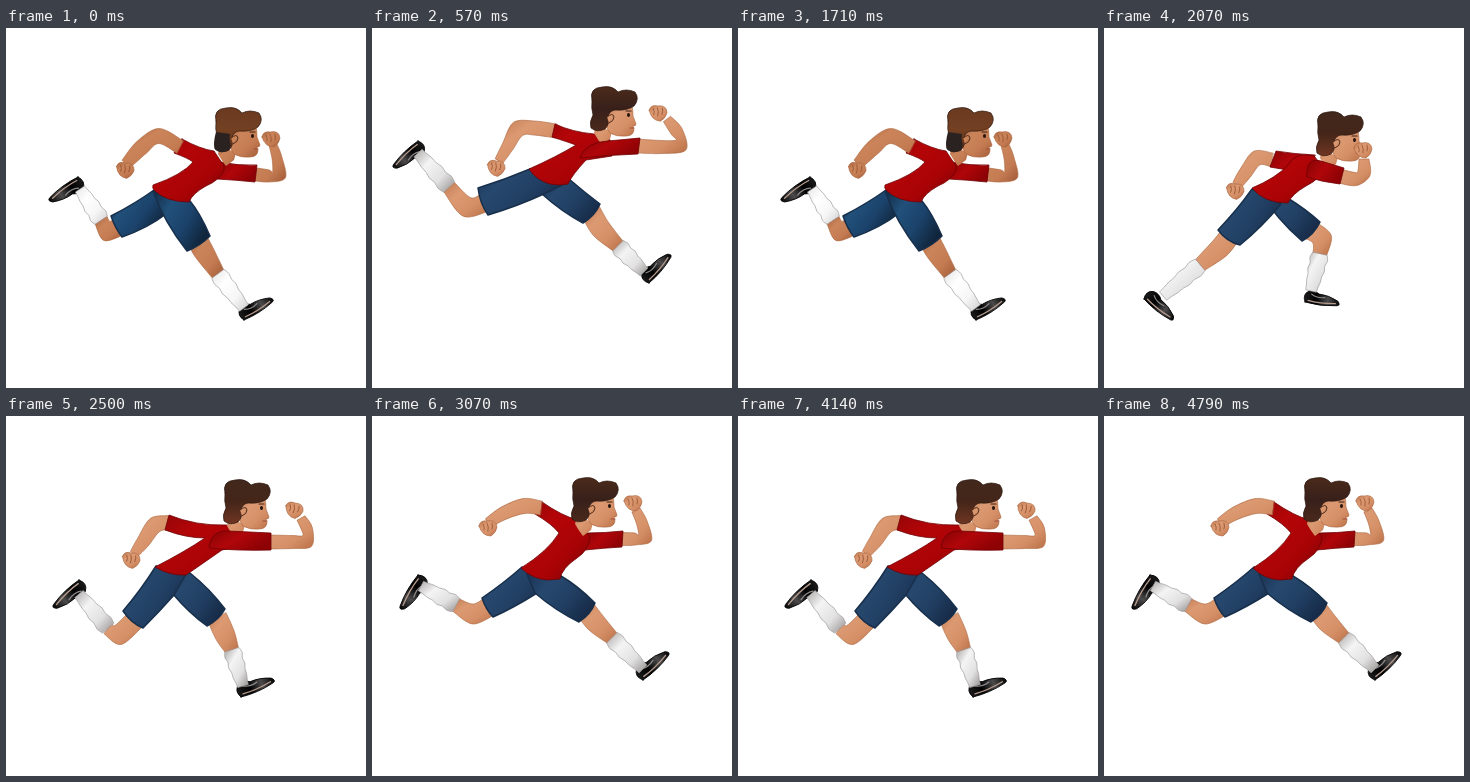
An HTML page for the animation above (5 s loop, 360 by 360 pixels).

```html
<!DOCTYPE html>
<html lang="en">
<head>
<meta charset="utf-8">
<title>Runner</title>
<style>
html, body { margin: 0; width: 100%; height: 100%; overflow: hidden; background: #fff; }
svg { display: block; width: 100%; height: 100%; }
</style>
</head>
<body>
<svg id="stage" viewBox="0 0 360 360"></svg>
<script>
const stage = document.getElementById('stage');

// ---- colours ----
const gradient = (id, dir, stops) =>
  `<linearGradient id="${id}" x1="0" y1="0" x2="${dir[0]}" y2="${dir[1]}">` +
  stops.map((c, i) => `<stop offset="${i / (stops.length - 1)}" stop-color="${c}"/>`).join('') +
  '</linearGradient>';

const defs = '<defs>' + [
  gradient('skinLight', [1, 1], ['#c07850', '#dc9a72', '#d58f66', '#b96f46']),
  gradient('skinDark', [1, 1], ['#a8623e', '#cb8459', '#c47b52', '#a05a36']),
  gradient('red', [1, 1], ['#8d0506', '#b40508', '#a90306', '#740203']),
  gradient('sleeve', [1, 0.5], ['#860304', '#b0060a', '#8e0205']),
  gradient('blueLight', [1, 0.6], ['#1b3355', '#27486e', '#213f63', '#172c49']),
  gradient('blueDark', [1, 0.6], ['#122a42', '#21507a', '#1b426a', '#10253b']),
  gradient('sockLight', [1, 1], ['#a9a6a5', '#f4f4f4', '#e2e1e1', '#928f8e']),
  gradient('sockDark', [1, 1], ['#e4e4e6', '#ffffff', '#f6f6f6', '#cfcfd1']),
  gradient('shoe', [1, 0], ['#1c1c1c', '#000000', '#4c4a4a', '#050505']),
  gradient('hairLight', [0, 1], ['#4b2b1b', '#38201a', '#4a291b']),
  gradient('hairRed', [0, 1], ['#42281c', '#442619', '#703522']),
  gradient('hairDark', [0, 1], ['#6a3a20', '#734022', '#5d2d18'])
].join('') + '</defs>';

// ---- helpers ----
const n = v => v.toFixed(1);
const shape = (d, fill, line = 'none', width = 1) =>
  `<path d="${d}" fill="${fill}" stroke="${line}" stroke-width="${width}" stroke-linejoin="round" stroke-linecap="round"/>`;

const spline = pts => pts.slice(1).map((p, i) => {
  const a = pts[i], before = pts[i - 1] || a, after = pts[i + 2] || p;
  return 'C' + [a[0] + (p[0] - before[0]) / 6, a[1] + (p[1] - before[1]) / 6,
    p[0] - (after[0] - a[0]) / 6, p[1] - (after[1] - a[1]) / 6, p[0], p[1]].map(n).join(' ');
}).join('');

// closed outline around a centre line of [x, y, width] points
function limb(pts) {
  const side = s => pts.map((p, i) => {
    const a = pts[i - 1] || p, b = pts[i + 1] || p;
    const dx = b[0] - a[0], dy = b[1] - a[1], k = s * p[2] / 2 / Math.hypot(dx, dy);
    return [p[0] - dy * k, p[1] + dx * k];
  });
  const l = side(1), r = side(-1).reverse();
  return `M${l[0].map(n)}${spline(l)}L${r[0].map(n)}${spline(r)}Z`;
}

const triples = list => {
  const out = [];
  for (let i = 0; i < list.length; i += 3) out.push(list.slice(i, i + 3));
  return out;
};

// ---- body parts ----
function shoe([hx, hy, tx, ty]) {
  const turn = Math.atan2(ty - hy, tx - hx) * 180 / Math.PI;
  const size = Math.hypot(tx - hx, ty - hy) / 36;
  return `<g transform="translate(${hx} ${hy}) rotate(${n(turn)}) scale(${size.toFixed(3)})">` +
    shape('M0 0Q-4 -8 3 -12Q9 -14 14 -10Q24 -10 34 -5Q38 -1 34 0Q17 3 0 0Z', 'url(#shoe)', '#000', 0.8) +
    shape('M3 -2Q16 0 32 -2', 'none', '#b49a8d', 1.3) +
    shape('M6 -9Q12 -5 20 -7', 'none', '#8d8b8b', 1.2) + '</g>';
}

function sock(sx, sy, ax, ay, tone) {
  const widths = [15, 18, 15, 17, 14, 14, 12, 11];
  const pts = widths.map((w, i) => {
    const t = i / (widths.length - 1);
    return [sx + (ax - sx) * t, sy + (ay - sy) * t, w];
  });
  return shape(limb(pts), `url(#sock${tone})`, '#9c9a9a', 0.7);
}

function leg({ bone, sole, shorts }, tone) {
  const [hx, hy, kx, ky, sx, sy, ax, ay] = bone;
  return shape(limb([[hx, hy, 20], [kx, ky, 20], [sx, sy, 14]]), `url(#skin${tone})`, '#a9663f', 0.6) +
    shoe(sole) + sock(sx, sy, ax, ay, tone) +
    shape(shorts, `url(#blue${tone})`, '#172f4b', 1.5);
}

function fist([x, y, turn], tone) {
  return `<g transform="translate(${x} ${y}) rotate(${turn})">` +
    shape('M-9 -2Q-8 -8 -1 -7Q8 -9 9 -1Q8 5 3 8Q-6 8 -9 -2Z', `url(#skin${tone})`, '#a9663f', 0.6) +
    shape('M-5 -4Q-3 -1 -4 2M-1 -5Q1 -1 0 3M4 -5Q5 -2 4 1', 'none', '#935232', 0.8) + '</g>';
}

function arm({ bone, hand, sleeve }, tone) {
  return shape(limb(triples(bone)), `url(#skin${tone})`, '#a9663f', 0.6) + fist(hand, tone) +
    (sleeve ? shape(sleeve, 'url(#sleeve)', '#6f0204', 0.8) : '');
}

function head([x, y], tone, hair) {
  const mop = 'M2 14Q-1 2 12 1Q22 -1 28 6Q36 2 45 6Q50 13 44 20Q37 25 25 24Q19 25 18 31Q20 38 15 43Q7 47 1 42Q-1 36 3 29Q1 22 2 14Z';
  return `<g transform="translate(${x} ${y})">` +
    shape('M6 38L4 47Q8 54 12 59L20 53L22 46Z', `url(#skin${tone})`) +
    shape('M14 24L42 19Q43 25 43 30L46 38Q46 40 43 40L44 44Q43 50 36 50Q27 51 20 47Q14 40 14 24Z',
      `url(#skin${tone})`, '#a9663f', 0.6) +
    shape(mop, `url(#hair${hair})`, '#2b1710', 0.7) +
    (hair === 'Dark' ? shape('M2 25L16 27Q15 31 16 35Q18 40 14 44Q5 47 1 42Q-1 35 2 25Z', '#2a2220') : '') +
    shape('M17 31Q23 26 24 31Q24 35 19 37', `url(#skin${tone})`, '#4c2a1a', 1) +
    shape('M36 25L41 25', 'none', '#3a2015', 1.2) +
    '<ellipse cx="38.5" cy="29" rx="1.5" ry="1.9" fill="#24150f"/>' +
    shape('M40 42L44 42', 'none', '#a24f3c', 1.2) + '</g>';
}

function runner(p) {
  const tone = p.tone || 'Light';
  return `<g visibility="hidden" transform="translate(${p.shift || [0, 0]})">` +
    arm(p.farArm, tone) + leg(p.farLeg, tone) + leg(p.nearLeg, tone) +
    shape(p.shirt, 'url(#red)', '#700204', 0.8) + head(p.head, tone, p.hair || tone) +
    arm(p.nearArm, tone) + '</g>';
}

// ---- poses of one stride pair ----
const landing = {
  tone: 'Dark', head: [208, 79],
  shirt: 'M176 111L168 125Q182 130 187 134Q176 147 147 157Q146 160 148 162Q160 174 183 174Q187 165 200 158Q214 152 218 142L218 138L208 123Q194 121 176 111Z',
  nearArm: { bone: [174, 119, 14, 153, 108, 15, 136, 119, 15, 120, 136, 11], hand: [119, 142, 10] },
  farArm: { bone: [247, 146, 13, 263, 148, 12, 273, 147, 14, 271, 130, 10, 267, 117, 8], hand: [265, 111, 0],
    sleeve: 'M214 134Q232 138 251 137L249 154Q230 152 211 151Z' },
  nearLeg: { bone: [191, 211, 198, 224, 212, 246, 238, 280], sole: [238, 292, 268, 273],
    shorts: 'M147 163Q158 194 181 223Q194 218 204 208Q194 185 184 173Z' },
  farLeg: { bone: [113, 198, 101, 203, 95, 192, 74, 161], sole: [72, 149, 42, 171],
    shorts: 'M148 162Q130 175 105 188Q109 200 116 209Q142 200 160 186Z' }
};

const passing = {
  head: [211, 85], hair: 'Red',
  shirt: 'M210 128Q192 123 184 137Q172 150 148 160Q160 175 184 175Q188 166 202 158Q218 150 219 140Z',
  nearArm: { bone: [172, 151, 14, 160, 163, 15, 169, 176, 12, 181, 186, 9], hand: [186, 190, 20],
    sleeve: 'M206 130Q188 126 178 137L165 147L174 161Q192 154 204 144Z' },
  farArm: { bone: [232, 158, 13, 249, 166, 14, 257, 154, 12, 259, 140, 9], hand: [259, 133, 0],
    sleeve: 'M214 134L240 153L231 165L207 150Z' },
  nearLeg: { bone: [179, 219, 183, 230, 183, 246, 181, 282], sole: [173, 293, 208, 291],
    shorts: 'M149 162Q154 197 165 224Q180 227 193 221Q192 192 184 174Z' },
  farLeg: { bone: [154, 218, 149, 234, 131, 237, 92, 229], sole: [79, 223, 74, 259],
    shorts: 'M150 162Q141 193 140 219Q153 227 168 223Q177 199 183 174Z' }
};

const pushing = {
  head: [212, 83], hair: 'Red', shirt: passing.shirt,
  nearArm: { bone: [235, 148, 14, 252, 151, 13, 260, 145, 13, 260, 131, 10], hand: [259, 122, 0],
    sleeve: 'M203 143Q204 129 217 133L240 140L236 156Q218 154 203 149Z' },
  farArm: { bone: [168, 132, 14, 153, 130, 15, 142, 144, 13, 133, 157, 10], hand: [131, 163, 10],
    sleeve: 'M211 127Q190 126 172 123L166 139Q187 143 201 143Z' },
  nearLeg: { bone: [125, 209, 115, 221, 96, 237, 59, 268], sole: [40, 271, 68, 293],
    shorts: 'M148 161Q134 181 114 202Q123 214 136 217Q158 199 177 176Z' },
  farLeg: { bone: [206, 202, 218, 211, 216, 226, 207, 263], sole: [201, 274, 235, 278],
    shorts: 'M156 164Q172 190 198 213Q210 207 216 194Q200 180 185 171Z' }
};

const flight = {
  head: [218, 58],
  shirt: 'M222 106Q200 104 183 96L180 109Q196 114 204 117Q184 129 157 141Q164 152 178 156Q188 158 196 156Q200 147 214 132L240 128L238 112Z',
  nearArm: { bone: [264, 118, 14, 290, 119, 13, 309, 117, 14, 305, 104, 12, 295, 91, 9], hand: [286, 85, 5],
    sleeve: 'M208 129Q214 114 236 113L268 110L266 126Q236 127 209 130Z' },
  farArm: { bone: [184, 103, 14, 162, 100, 14, 146, 101, 16, 136, 118, 12, 127, 133, 9], hand: [124, 140, 10] },
  nearLeg: { bone: [113, 174, 95, 179, 77, 159, 46, 125], sole: [46, 113, 20, 138],
    shorts: 'M158 141Q132 152 106 160Q108 176 116 187Q146 178 174 165L190 157Z' },
  farLeg: { bone: [219, 184, 229, 201, 246, 218, 272, 244], sole: [277, 255, 300, 228],
    shorts: 'M168 156L170 166Q190 184 211 195Q223 188 228 176Q212 164 197 151Z' }
};

const landing2 = {
  head: [217, 63], hair: 'Red',
  shirt: 'M220 109Q190 110 163 99L159 114Q180 122 199 122Q180 135 149 151Q164 160 180 159Q196 148 216 134L235 130L232 113Z',
  nearArm: { bone: [262, 126, 14, 286, 126, 13, 301, 125, 14, 301, 113, 11, 295, 102, 9], hand: [288, 94, 15],
    sleeve: 'M203 130Q206 114 222 115L265 117L265 134Q230 135 204 132Z' },
  farArm: { bone: [163, 107, 15, 149, 109, 16, 137, 126, 13, 128, 138, 9], hand: [125, 144, 10] },
  nearLeg: { bone: [130, 203, 112, 219, 102, 212, 73, 178], sole: [73, 164, 46, 190],
    shorts: 'M150 150Q135 174 117 195Q125 207 137 212Q153 196 168 179L180 158Z' },
  farLeg: { bone: [211, 201, 219, 219, 226, 234, 237, 270], sole: [235, 281, 269, 266],
    shorts: 'M160 157L167 178Q183 197 201 210Q213 204 219 193Q204 173 184 157Z' }
};

const flight2 = {
  head: [199, 61],
  shirt: 'M170 86L163 98Q180 108 187 117Q176 135 149 152Q160 163 176 164L188 163Q190 152 205 142Q216 135 218 122L206 104Q190 100 170 86Z',
  nearArm: { bone: [169, 92, 14, 152, 90, 15, 132, 97, 13, 116, 107, 10], hand: [116, 112, 0] },
  farArm: { bone: [248, 123, 13, 263, 123, 12, 273, 122, 14, 270, 107, 11, 264, 94, 9], hand: [261, 87, 0],
    sleeve: 'M215 117Q233 117 251 115L250 131Q232 132 213 134Z' },
  nearLeg: { bone: [214, 194, 224, 207, 240, 222, 271, 253], sole: [271, 264, 298, 238],
    shorts: 'M155 158L163 177Q184 195 207 206Q219 198 223 187Q206 170 189 160Z' },
  farLeg: { bone: [118, 190, 101, 198, 84, 189, 49, 170], sole: [46, 159, 27, 192],
    shorts: 'M150 151Q132 167 110 182Q114 194 121 201Q143 191 165 177L176 163Z' }
};

// the other foot's half of the stride
const mirror = (p, shift) => ({ ...p, shift, nearLeg: p.farLeg, farLeg: p.nearLeg });
const swing = { ...passing,
  nearArm: { ...passing.farArm, sleeve: 'M205 143Q207 130 218 135L240 153L231 165Q214 158 205 150Z' },
  farArm: passing.nearArm };
const drive = { ...pushing,
  nearArm: { ...pushing.farArm, sleeve: 'M209 129Q190 126 172 123L166 139Q187 145 201 145Z' },
  farArm: pushing.nearArm };

const poses = [landing, passing, pushing, flight, landing2,
  mirror(swing, [4, -8]), mirror(drive, [11, -8]), flight2];

stage.innerHTML = defs + poses.map(runner).join('');
const groups = [...stage.querySelectorAll('svg > g')];

// ---- timing ----
const LOOP = 5000;
const starts = [0, 210, 430, 570, 790, 1000, 1210, 1430, 1710, 1860, 2070, 2290,
  2500, 2710, 2860, 3070, 3360, 3570, 3790, 3930, 4140, 4360, 4570, 4790];
const begin = performance.now();

function draw(now) {
  const t = Math.max(0, now - begin) % LOOP;
  const step = starts.filter(s => s <= t).length - 1;
  groups.forEach((g, i) => g.setAttribute('visibility', i === step % poses.length ? 'visible' : 'hidden'));
  requestAnimationFrame(draw);
}
draw(begin);
</script>
</body>
</html>
```
